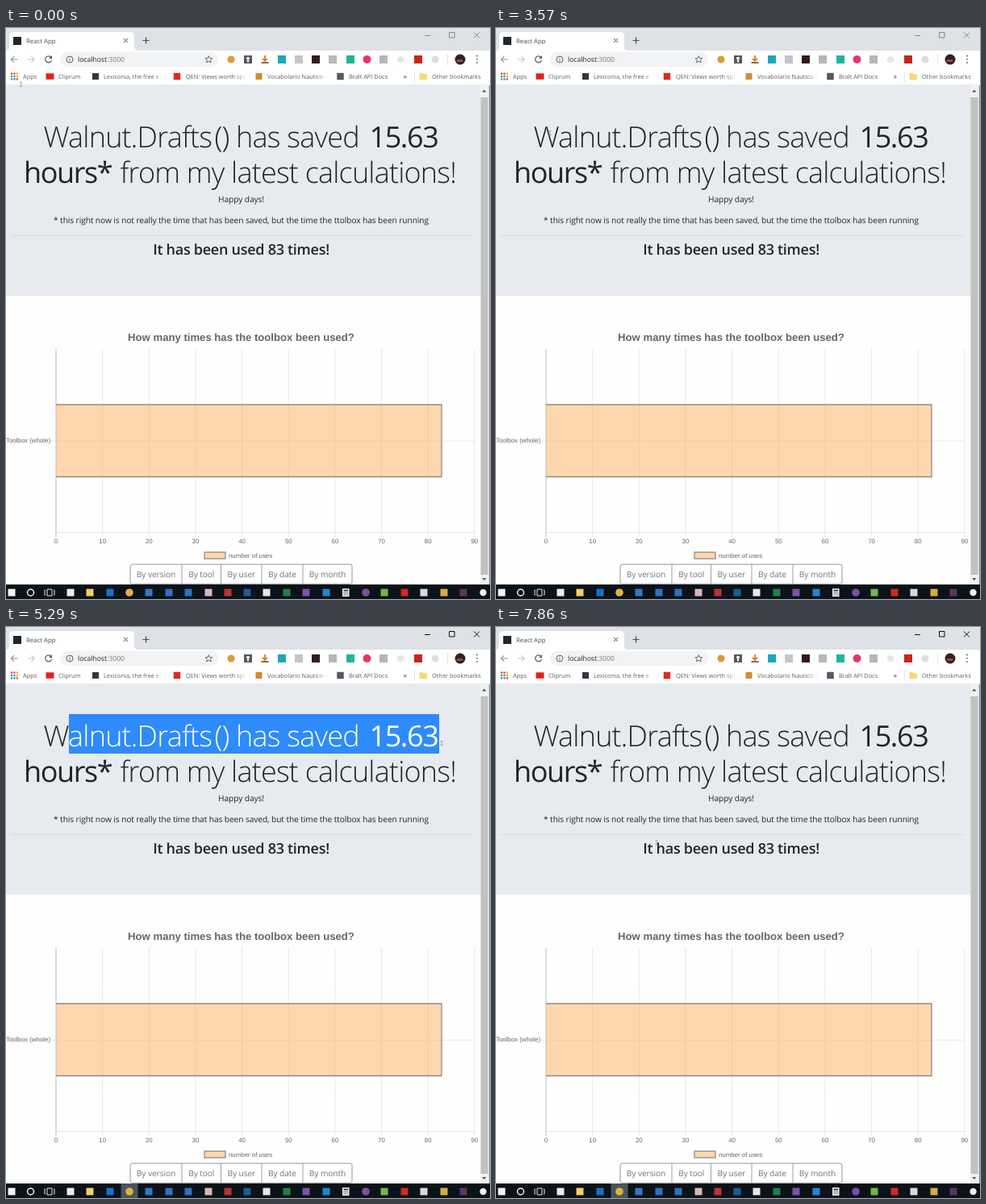
These frames come from a looping animation (600 px wide and 708 px high, 8 s). An HTML page:

```html
<!DOCTYPE html>
<html lang="en">
<head>
<meta charset="utf-8">
<title>Toolbox usage</title>
<style>
  html, body { margin: 0; width: 100%; height: 100%; overflow: hidden; background: #fff; }
  svg { display: block; width: 600px; height: 708px; }
  text { font-family: "Open Sans", "Noto Sans", sans-serif; text-rendering: geometricPrecision; white-space: pre; }
  .arial { font-family: "Liberation Sans", Arial, sans-serif; fill: #666; }
  .body { font-size: 10.2px; letter-spacing: -.09px; }
  .display { font-size: 36px; font-weight: 300; letter-spacing: -.8px; }
  .strong { font-weight: 400; letter-spacing: -1.4px; }
</style>
</head>
<body>
<svg id="stage" viewBox="0 0 600 708"></svg>
<script>
const LOOP = 8000, STEPS = 56;
const stage = document.getElementById('stage');

const rect = (x, y, w, h, fill, more = '') =>
  `<rect x="${x}" y="${y}" width="${w}" height="${h}" fill="${fill}" ${more}/>`;
const disc = (x, y, r, fill, more = '') =>
  `<circle cx="${x}" cy="${y}" r="${r}" fill="${fill}" ${more}/>`;
const path = (d, stroke, width = 1, more = '') =>
  `<path d="${d}" fill="none" stroke="${stroke}" stroke-width="${width}" ${more}/>`;
const text = (x, y, s, more = '') => `<text x="${x}" y="${y}" ${more}>${s}</text>`;
const mid = 'text-anchor="middle"';
const tile = (x, y, size, fill) => rect(x - size / 2, y - size / 2, size, size, fill);

function windowFrame() {
  const tab = 'M0 28 Q4 28 4 23 V10 Q4 5 9 5 H154 Q159 5 159 10 V23 Q159 28 164 28 Z';
  return rect(0, 0, 600, 28, '#dee1e6') +
    `<path d="${tab}" fill="#fff"/>` +
    tile(14, 16, 10, '#20262e') +
    text(25, 18.8, 'React App', 'font-size="7.8" fill="#45494d"') +
    path('M146 13 l5 5 m0 -5 l-5 5', '#4a4d51') +
    path('M169.5 15.5 h8 m-4 -4 v8', '#4a4d51', 1.2) +
    `<g id="buttons" fill="none" stroke-width="1">
      <path d="M519 9.5 h7 M549.5 5.5 h6.5 v6.5 h-6.5 z M580 5.5 l7 7 m0 -7 l-7 7"/></g>`;
}

function toolbar() {
  const dots = [34.5, 38.8, 43].map(y => disc(584, y, .9, '#55595e')).join('');
  const squares = [[342, '#19a9bd'], [363, '#c3c5c8'], [384, '#35191c'], [405, '#b5b7ba'],
    [427, '#20b59a'], [468, '#b4b6b9'], [511, '#c4281d']];
  return path('M14.5 39 H6.5 M10 35.3 L6.3 39 L10 42.7', '#8d9196', 1.1) +
    path('M27 39 H35 M31.5 35.3 L35.2 39 L31.5 42.7', '#c6c8cb', 1.1) +
    path('M55.8 36.3 A4 4 0 1 0 56.5 40.2', '#55595e', 1.2) +
    '<path d="M57 34 V38 H53 Z" fill="#55595e"/>' +
    rect(67, 29.5, 196, 18.5, '#f1f3f4', 'rx="9.2"') +
    disc(79, 39, 4, 'none', 'stroke="#5f6368"') +
    path('M79 38.5 V41.3 M79 36.5 V37.5', '#5f6368') +
    text(89, 42.2, 'localhost<tspan fill="#777b80">:3000</tspan>', 'font-size="8.6" fill="#222"') +
    path('M251.3 34.7 l1.3 2.8 3.1 .3 -2.3 2.1 .7 3 -2.8 -1.6 -2.7 1.6 .7 -3 -2.3 -2.1 3.1 -.3 z', '#55595e', .9) +
    disc(279, 39, 4.5, '#d99a3c') +
    tile(300, 39, 10, '#55585c') + disc(300, 37.8, 2, '#fff') + rect(299, 40, 2, 2.5, '#fff') +
    path('M321 34 V40 M318 37.8 L321 40.8 L324 37.8', '#e07b16', 1.8) +
    path('M316.5 43 H325.5', '#5b3a1c', 1.5) +
    squares.map(([x, c]) => tile(x, 39, 10, c)).join('') +
    disc(447.5, 39, 5, '#e8336d') + disc(489, 39, 4, '#e4e5e7') + disc(532, 39, 4.5, '#dcdee0') +
    path('M547.5 32 V46', '#e1e3e5') +
    disc(563, 39, 6.5, '#2c2426') + rect(558.5, 39, 8, 3, '#a5473f', 'rx="1.5"') +
    dots;
}

function bookmarks() {
  const label = (x, s) => text(x, 62.7, s, 'font-size="7.4" fill="#5a5e63"');
  const fade = x => rect(x - 14, 53, 14, 14, 'url(#fade)') + rect(x, 53, 9, 14, '#fff');
  const colors = ['#e0483c', '#e0483c', '#eab22c', '#48a25a', '#4b83d8', '#eab22c', '#48a25a', '#4b83d8', '#e0483c'];
  const apps = colors.map((c, i) => tile(7 + i % 3 * 3.4, 56.6 + (i / 3 | 0) * 3.4, 2.3, c)).join('');
  return apps + label(21, 'Apps') +
    rect(49.5, 56.3, 10, 7.5, '#e3211c') + label(65, 'Cliprum') +
    tile(111, 60, 8, '#33363a') + label(121, 'Lexiconia, the free e') + fade(196) +
    tile(212, 60, 8.5, '#dd2b1f') + label(223, 'QEN: Views worth spr') + fade(298) +
    tile(313.5, 60, 8, '#d58a2f') + label(324, 'Vocabolario Nautico-In') + fade(399) +
    tile(414.5, 60, 8.5, '#55585c') + label(425, 'Bralt API Docs') +
    text(492.5, 62.8, '»', 'font-size="9" fill="#45494d"') +
    path('M506.5 53 V67', '#e1e3e5') +
    '<path d="M512.5 56 h4 l1 1.3 h4.5 v7 h-9.5 z" fill="#f8d775"/>' +
    label(528, 'Other bookmarks') +
    rect(0, 70.5, 598, .8, '#d9dce0');
}

const heading = '<g id="head" class="display">' +
  text(46.5, 148, 'Walnut.Drafts') + text(258.5, 148, '() has saved') +
  text(450.5, 148, '15.63', 'class="strong"') +
  text(22, 192, 'hours*', 'class="strong"') +
  text(141.5, 192, 'from my latest calculations!') + '</g>';

function banner() {
  return rect(0, 71, 588, 261, '#e7eaef') +
    '<use href="#head" fill="#212529"/>' +
    `<g fill="#212529" ${mid}>` +
    text(291.5, 216, 'Happy days!', 'class="body"') +
    text(291.5, 242.3, '* this right now is not really the time that has been saved, but the time the ttolbox has been running', 'class="body"') +
    text(291.5, 280.8, 'It has been used 83 times!', 'font-size="18" font-weight="600" letter-spacing="-.27"') +
    '</g>' + rect(6, 256.8, 573, .8, '#d2d5d9');
}

function chart() {
  const gap = 57.65, left = 62;
  let out = text(291.5, 387.8, 'How many times has the toolbox been used?',
    `class="arial" font-size="13.13" font-weight="700" ${mid}`);
  for (let i = 0; i < 10; i++) {
    const x = left + i * gap;
    out += rect(x - .4, 398, .8, 233, i ? '#e3e3e5' : '#a9b0b5') +
      text(x, 638.8, i * 10, `class="arial" font-size="7.86" ${mid}`);
  }
  return out +
    rect(57, 511.7, 523, .8, '#e3e3e5') + rect(62, 625, 519, .8, '#dcdee0') +
    rect(62, 467, 478, 89.5, '#ff9f40', 'fill-opacity=".42"') +
    path('M62 467 H540 V556.5 H62', '#918b82', 1.3) +
    text(55, 514.3, 'Toolbox (whole)', 'class="arial" font-size="7.86" text-anchor="end"') +
    rect(246, 650, 26, 8, '#fed7b0', 'stroke="#918b82" stroke-width="1.3"') +
    text(276, 656.6, 'number of uses', 'class="arial" font-size="7.86"');
}

function buttons() {
  const edges = [154, 218, 266.5, 317, 368, 429];
  const names = ['version', 'tool', 'user', 'date', 'month'];
  return rect(154, 665, 275, 24.3, '#fff', 'rx="2.6" stroke="#858c93" stroke-width=".9"') +
    edges.slice(1, -1).map(x => rect(x - .4, 665, .8, 24, '#858c93')).join('') +
    names.map((n, i) => text((edges[i] + edges[i + 1]) / 2, 681.4, 'By ' + n,
      `class="body" fill="#6c757d" ${mid}`)).join('');
}

function scrollbar() {
  return rect(588, 71, 10, 619, '#f1f1f1') + rect(588.5, 86, 9, 592, '#c1c1c1') +
    '<path d="M590 79.5 l2.8 -3 2.8 3 z M590 682 l2.8 3 2.8 -3 z" fill="#55585c"/>' +
    rect(598, 71, 1, 619, '#dcdde0') + '<rect id="edge" x="599" y="71" width="1" height="619"/>';
}

function taskbar() {
  const y = 700;
  const tiles = [[80, '#eceef0'], [104, '#f3cf66'], [129, '#1674c5'], [177, '#3477c9'], [202, '#2d72be'],
    [226, '#2d72be'], [251, '#d8b9b6'], [275, '#b93434'], [299, '#1b5d94'], [323, '#e8e8e8'], [348, '#1f8049'],
    [372, '#7d52a8'], [397, '#2186cf'], [469, '#73b64b'], [494, '#d02a23'], [518, '#d9dadb'],
    [543, '#d2ad45'], [567, '#59355f']];
  return rect(0, 690, 600, 18, '#0c1219') +
    '<rect id="active" x="142.5" y="690" width="21" height="18" fill="#4b535b"/>' +
    tile(7, y, 9, '#f2f4f5') + disc(30.5, y, 4, 'none', 'stroke="#f2f4f5" stroke-width="1.5"') +
    path('M51 696 h6 v8 h-6 z M49 697 h-1 v6 h1 M59 697 h1 v6 h-1', '#e5e8ea') +
    tiles.map(([x, c]) => tile(x, y, 9, c)).join('') +
    disc(153, y, 4.8, '#dfb23d') + disc(446, y, 4.8, '#7a4fa0') + disc(591.5, y, 4.2, '#eef0f1') +
    rect(417, 695, 8.5, 10, '#eceef0') + rect(418.5, 696.5, 5.5, 2, '#39424b') +
    path('M418.5 700.5 h5.5 M418.5 702.8 h5.5', '#39424b', 1, 'stroke-dasharray="1.3 .8"');
}

stage.innerHTML = `<defs>
  <linearGradient id="fade"><stop stop-color="#fff" stop-opacity="0"/><stop offset="1" stop-color="#fff"/></linearGradient>
  ${heading}
  <clipPath id="picked"><rect id="row1" x="78" y="108" height="49"/><rect id="row2" x="24" y="152" height="49"/></clipPath>
  </defs>` + rect(0, 0, 600, 708, '#fefefe') + rect(0, 28, 600, 43, '#fff') +
  windowFrame() + toolbar() + bookmarks() + banner() +
  `<g clip-path="url(#picked)">${rect(0, 100, 600, 110, '#2d8bfb')}<use href="#head" fill="#fff"/></g>` +
  chart() + buttons() + scrollbar() + taskbar() +
  `<g id="cursor">${path('M-1.5 -2.5 H1.5 M0 -2.5 V2.5 M-1.5 2.5 H1.5', '#85898d', .7)}</g>`;

// Pointer keys: step, x, y
const pointer = [[0, 18.5, 70], [1, 18.5, 70], [4, 150, 200], [8, 440, 500], [10, 536, 522], [13, 420, 480],
  [16, 317, 439], [18, 400, 490], [20, 536, 528], [22, 300, 330], [24, 56, 122], [26, 78, 138],
  [29, 284, 117], [31, 320, 132], [35, 510, 138], [37, 540, 144], [39, 538, 178], [42, 535, 188],
  [43, 513, 186], [48, 400, 272], [52, 176, 272], [53, 176, 272], [55, 199, 267.5]];
// Right end of the selected part: step, first line, second line
const picks = [[0, 78, 24], [27, 120, 24], [28, 190, 24], [29, 258, 24], [31, 289, 24], [32, 328, 24],
  [33, 363, 24], [34, 418, 24], [35, 472, 24], [36, 510, 24], [37, 537, 24], [39, 548, 535], [43, 78, 24]];
const FOCUS = 26;

const el = id => document.getElementById(id);
const lastKey = (keys, k) => keys.reduce((found, key, i) => key[0] <= k ? i : found, 0);

function draw(k) {
  const i = lastKey(pointer, k), a = pointer[i], b = pointer[i + 1] || a;
  const u = b === a ? 0 : (k - a[0]) / (b[0] - a[0]);
  el('cursor').setAttribute('transform',
    `translate(${a[1] + (b[1] - a[1]) * u} ${a[2] + (b[2] - a[2]) * u})`);

  const [, end1, end2] = picks[lastKey(picks, k)];
  el('row1').setAttribute('width', end1 - 78);
  el('row2').setAttribute('width', end2 - 24);

  const focused = k >= FOCUS;
  el('buttons').setAttribute('stroke', focused ? '#111' : '#888b90');
  el('active').setAttribute('opacity', focused ? 1 : 0);
  el('edge').setAttribute('fill', focused ? '#6f96ba' : '#8f9093');
}

function tick() {
  const t = performance.now() % LOOP;
  draw(Math.floor((t + 5) * STEPS / LOOP) % STEPS);
  requestAnimationFrame(tick);
}
tick();
</script>
</body>
</html>
```
